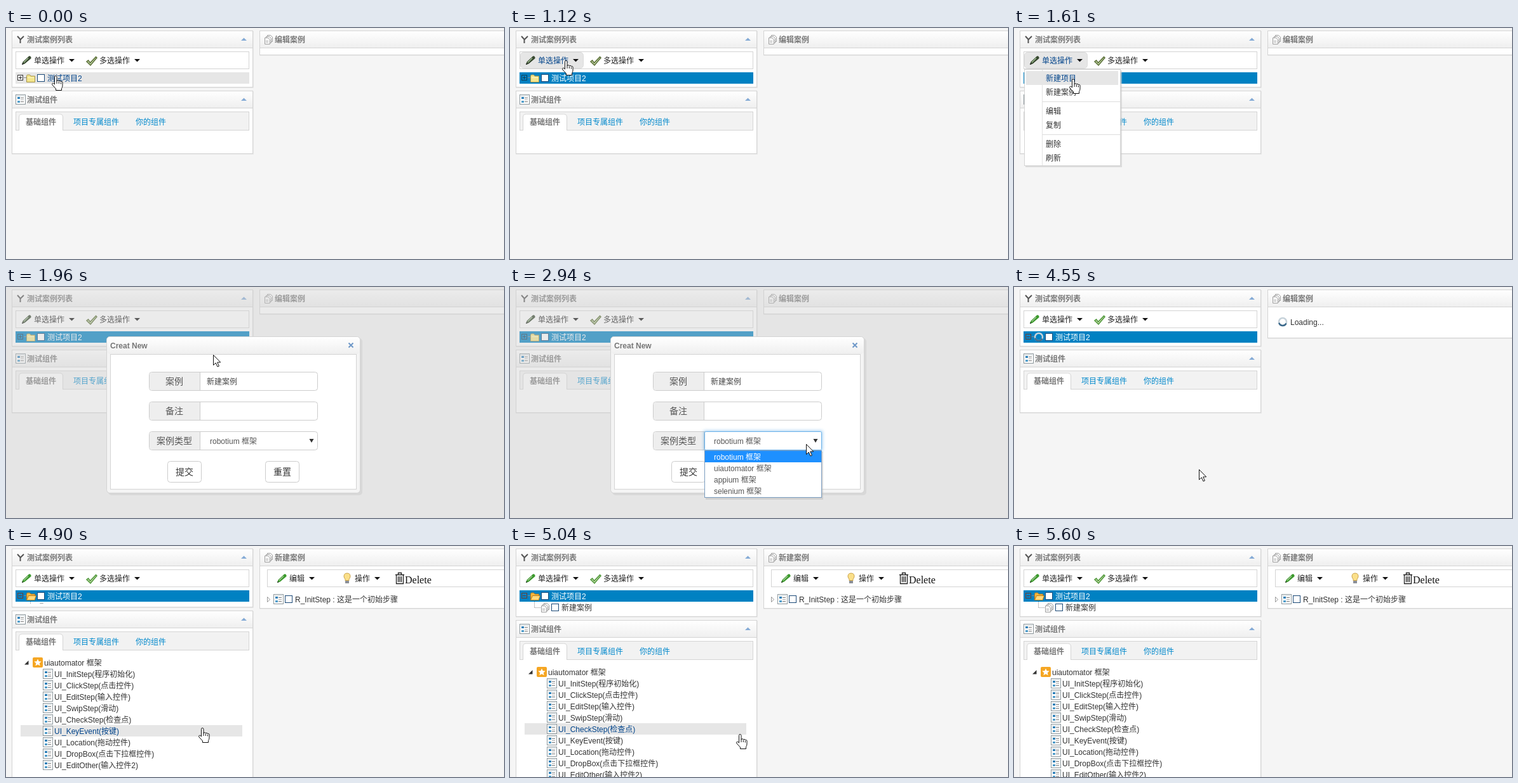
These frames come from a looping animation (784x365 px, 5880 ms). An HTML page:

```html
<!DOCTYPE html>
<html lang="zh">
<head>
<meta charset="utf-8">
<title>Test case editor</title>
<style>
html, body { margin: 0; width: 100%; height: 100%; overflow: hidden; background: #f5f5f5; }
svg { display: block; width: 784px; height: 365px; }
text { font: 12px "Liberation Sans", "Noto Sans CJK SC", "Noto Sans CJK", sans-serif; white-space: pre; }
.b { font-weight: bold; }
.l { font-size: 14px; }
.m { text-anchor: middle; }
.s { font: 16px "Liberation Serif", serif; }
</style>
</head>
<body>
<svg id="stage" viewBox="0 0 784 365" xmlns="http://www.w3.org/2000/svg">
  <defs>
    <linearGradient id="head" x2="0" y2="1">
      <stop offset="0" stop-color="#fff"/><stop offset="1" stop-color="#efefef"/>
    </linearGradient>
    <filter id="glow" x="-20%" y="-60%" width="140%" height="220%"><feGaussianBlur stdDeviation="2.5"/></filter>
  </defs>
  <g id="scene"></g>
</svg>
<script>
const LOOP = 5880, STEP = 70;
const NAVY = '#00438a', BLUE = '#0081c2', LINK = '#0088cc', LINE = '#d4d4d4', GREY = '#777', INK = '#333';
const scene = document.getElementById('scene');

// cursor hot spot: time, x, y
const PATH = [
  [0, 78, 75], [770, 78, 75], [980, 88, 52], [1050, 88, 52], [1120, 88, 51], [1330, 88, 51],
  [1750, 96, 95], [1890, 96, 95], [1960, 326, 107], [2170, 456, 196], [2240, 456, 196],
  [2520, 483, 244], [2870, 483, 244], [3360, 365, 275], [3780, 365, 275], [3850, 363, 276],
  [4130, 291, 288], [4760, 291, 288], [4900, 309, 287], [4970, 316, 288], [5600, 730, 372]
];
const STEPS = ['InitStep(程序初始化)', 'ClickStep(点击控件)', 'EditStep(输入控件)', 'SwipStep(滑动)',
  'CheckStep(检查点)', 'KeyEvent(按键)', 'Location(拖动控件)', 'DropBox(点击下拉框控件)', 'EditOther(输入控件2)'];
const MENU = ['新建项目', '新建案例', '', '编辑', '复制', '', '删除', '刷新'];
const FRAMEWORKS = ['robotium 框架', 'uiautomator 框架', 'appium 框架', 'selenium 框架'];

function pointer(t) {
  const i = PATH.findIndex(k => k[0] > t);
  if (i < 0) return { x: 730, y: 372 };
  const [a, x, y] = PATH[i - 1], [b, u, v] = PATH[i], p = (t - a) / (b - a);
  return { x: Math.round(x + (u - x) * p), y: Math.round(y + (v - y) * p) };
}

const fill = (x, y, w, h, c, more = '') => `<rect x="${x}" y="${y}" width="${w}" height="${h}" fill="${c}" ${more}/>`;
const box = (x, y, w, h, c, line = LINE, r = 0) => fill(x + .5, y + .5, w, h, c, `stroke="${line}" rx="${r}"`);
// text is placed by the middle of its line
const text = (x, mid, s, c = INK, cls = '') =>
  `<text x="${x}" y="${mid + (/l/.test(cls) ? 5.3 : 4.5)}" fill="${c}" class="${cls}">${s}</text>`;
const path = (d, c, line = 'none', w = 1) =>
  `<path d="${d}" fill="${c}" stroke="${line}" stroke-width="${w}"/>`;
const at = (x, y, s) => `<g transform="translate(${x} ${y})">${s}</g>`;
const caret = (x, y) => path(`M${x} ${y - 2}h9l-4.5 4.5z`, '#111');
const check = (x, y) => box(x, y, 11, 11, '#fff', '#1c4a78');

const pencil = (x, y, c) => at(x, y,
  path('M0 14l1.5-4.5L10.500 1q2-1.500 3.500.5t0 3L4.500 12.500z', c) + path('M3 10.500l7-7', 'none', '#a9c79c', 1.300) + path('M0 14l.8-2.500 1.700 1.700z', '#222'));
const tick = (x, y, c) => path(`M${x} ${y + 8}l2.500-2 3 4 9-9.500 1.500 1.500-10 12z`, '#c9dcb0', c, 1.500);
const component = (x, y) => at(x, y, box(0, 0, 15, 15, '#fff', '#8c979c') + fill(2, 2, 12, 1, '#c8d2d6')
  + fill(3, 4, 4, 3, '#2b7fb8') + fill(3, 10, 4, 3, '#4f9cc9')
  + fill(8, 5, 5, 1, '#777') + fill(8, 8, 5, 1, '#aaa') + fill(8, 11, 5, 1, '#777'));
const page = (x, y) => path(`M${x + .5} ${y + .5}h5l3 3v7h-8z`, '#f6f6f6', '#a0a0a0') + fill(x + 2, y + 5, 4, 1, '#bbb') + fill(x + 2, y + 7, 4, 1, '#bbb');
const pages = (x, y) => page(x + 4, y) + page(x + 2, y + 2) + page(x, y + 4);
const spinner = (x, y, t) => `<g fill="none" stroke-width="2.500"><circle cx="${x}" cy="${y}" r="6" stroke="#c6d2da"/>
  <path d="M${x} ${y - 6}a6 6 0 0 1 4 10.500" stroke="#3c6a8c" transform="rotate(${t * .5} ${x} ${y})"/></g>`;
const star = (x, y) => fill(x, y, 16, 16, '#f5a623', 'rx="2"')
  + path(`M${x + 8} ${y + 2.500}l1.700 3.700 4 .4-3 2.700.9 4-3.600-2.100-3.600 2.100.9-4-3-2.700 4-.4z`, '#fff');

function folder(x, y, vivid, open) {
  const c = vivid ? '#f6b73c' : '#f3e58c', line = vivid ? '#b9791b' : '#a3924a';
  return path(`M${x + .5} ${y + 12.500}v-10l1-1.500h4l1.500 2h6.500v9.500z`, c, line)
    + (open ? path(`M${x + .5} ${y + 12.500}l3-7h12l-2.500 7z`, '#ffd97a', line) : fill(x + 2, y + 5, 10, 1, '#fff8c8'));
}

function panel(x, y, w, h, title) {
  return fill(x, y + 1, w + 2, h + 1, '#e9e9e9') + box(x, y, w, h, '#fff') + fill(x + 1, y + 1, w - 1, 26, 'url(#head)')
    + fill(x, y + 27, w, 1, LINE) + text(x + 24, y + 14, title, GREY, 'b')
    + (w < 380 ? path(`M370 ${y + 16}h9l-4.500-4.500z`, '#85abd6') : '');
}

const arrow = ({ x, y }) => at(x, y, path('M.5.5v16l3.700-3.500 2.800 6 2.400-1-2.700-6h5z', '#fff', '#111'));
const hand = ({ x, y }) => at(x - 6, y,
  path('M4.500 14V2.500q0-2 1.700-2t1.800 2V9q.3-1.500 1.800-1.300t1.500 1.600q.4-1.100 1.700-.9t1.400 1.700q.4-.9 1.400-.7t1.200 1.600V16q0 2.500-1.500 4.500v3h-9v-2.500L1 15q-1.100-2 .3-2.700t3.200 1.700z', '#fff', '#111')
  + path('M8 9v4M11.300 10v3M14.400 11v2.500', 'none', '#111'));

function cases(t, p, drop) {
  const vivid = t >= 4410, busy = t >= 4480, expanded = t >= 4830;
  const selected = t >= 560, over = t >= 910 && t < 1960;
  const green = vivid ? '#3b9a2c' : '#37482f', mark = vivid ? '#4b9636' : '#566b32';
  let s = panel(9, 4, 379, 89 + drop, '测试案例列表');
  s += path('M18 13l4.500 5v6M28 13l-5 5', 'none', '#555', 2);
  s += box(15, 37, 367, 27, '#fff');
  if (over) s += box(16, 38, 99, 25, '#e6e6e6', '#dcdcdc', 5);
  s += pencil(25, 44, green) + text(44, 51, '单选操作', over ? NAVY : '#222') + caret(99, 51);
  s += tick(127, 45, mark) + text(147, 51, '多选操作', '#222') + caret(202, 51);

  s += fill(15, 70, 368, 18, selected ? BLUE : '#e6e6e6');
  const sign = vivid ? '#6b4038' : selected ? '#123f5a' : '#333';
  s += box(18, 74, 8, 8, selected ? 'none' : '#fff', sign) + fill(20, 78, 5, 1, sign);
  if (!busy) s += fill(22, 76, 1, 5, sign);
  s += path('M28 78.500h4', 'none', '#888') ;
  s += busy && !expanded ? spinner(39, 79, t) : folder(32, 73, vivid, expanded);
  s += check(49, 73) + text(65, 79, '测试项目2', selected ? '#fff' : NAVY);
  if (drop) {
    s += `<clipPath id="slide">${fill(15, 88, 368, drop, '#000')}</clipPath><g clip-path="url(#slide)">`
      + '<path d="M38.500 88v9M39 97.500h9" stroke="#888" fill="none" stroke-dasharray="1 1"/>'
      + pages(49, 90) + check(65, 91) + text(81, 97, '新建案例') + '</g>';
  }
  return s;
}

function components(t, p, drop) {
  const loaded = t >= 4760;
  let s = panel(9, 99, 379, loaded ? 300 : 99, '测试组件') + component(15, 105);
  s += box(15, 132, 367, 29, '#f2f2f2');
  s += path('M20.500 162v-21q0-5 5-5h59q5 0 5 5v21', '#fff', LINE);
  s += text(31, 148, '基础组件', GREY, 'b') + text(106, 148, '项目专属组件', LINK) + text(204, 148, '你的组件', LINK);
  if (loaded) {
    s += path('M35.500 178v6.500h-6.500z', INK) + star(42, 173) + text(60, 181, 'uiautomator 框架');
    STEPS.forEach((name, i) => {
      const mid = 199 + 18 * i, y = p.y - drop;
      const over = p.x < 372 && y >= mid - 9 && y < mid + 9;
      if (over) s += fill(23, mid - 9, 349, 18, '#e6e6e6');
      s += component(58, mid - 8) + text(76, mid, 'UI_' + name, over ? NAVY : INK);
    });
  }
  return at(0, drop, s);
}

function editor(t) {
  const loading = t >= 4480 && t < 4760, ready = t >= 4760;
  let s = panel(399, 4, 400, ready ? 94 : loading ? 76 : 38, ready ? '新建案例' : '编辑案例') + pages(407, 11);
  if (loading) s += spinner(423, 55, t) + text(435, 55.500, 'Loading...');
  if (!ready) return s;
  s += box(411, 37, 390, 27, '#fff') + pencil(427, 44, '#3b9a2c') + text(446, 51, '编辑', '#222') + caret(477, 51);
  s += path('M537 43q5 0 5 5 0 2-2 4.500v2h-6v-2q-2-2.500-2-4.500 0-5 5-5z', '#fbe08a', '#c9a24a')
    + fill(534, 55, 6, 4, '#8a8f98') + text(549, 51, '操作', '#222') + caret(580, 51);
  s += path('M613 45.500h14M617.500 45v-2.500h5V45M614.500 46v13.500h11V46M617.500 48v9M620 48v9M622.500 48v9', 'none', '#222', 1.300);
  s += text(628, 54.500, 'Delete', '#111', 's');
  s += path('M411.500 80.500v8l4-4z', '#fff', '#999') + component(421, 76) + check(439, 78);
  return s + text(455, 84, 'R_InitStep : 这是一个初始步骤');
}

function menu(p) {
  let s = fill(18, 67, 152, 153, '#ccc', 'opacity=".6"') + box(16, 65, 151, 152, '#fff') + fill(44, 66, 1, 151, '#e2e2e2');
  let y = 68;
  for (const item of MENU) {
    const h = item ? 22 : 8;
    if (!item) s += fill(45, y + 4, 122, 1, '#ddd');
    else {
      const over = p.y >= y && p.y < y + h;
      if (over) s += fill(19, y, 145, h, '#e6e6e6');
      s += text(50, y + 11, item, over ? NAVY : INK);
    }
    y += h;
  }
  return s;
}

function field(y, label, value) {
  return box(225, y, 265, 29, '#fff', '#ccc', 4) + path(`M306 ${y + 1}h-76q-4 0-4 4v20q0 4 4 4h76z`, '#eee')
    + fill(305, y, 1, 30, '#ccc') + text(265, y + 15, label, '#555', 'l m') + text(316, y + 15, value, '#444');
}

function button(x, label, over) {
  return box(x, 275, 53, 33, over ? '#e6e6e6' : '#fff', over ? '#adadad' : '#ccc', 4) + text(x + 27, 292, label, INK, 'l m');
}

function dialog(t, p) {
  const focus = t >= 2730, list = t >= 2800 && t < 3850;
  const choice = t >= 3850 ? 1 : 0;
  let s = fill(0, 0, 784, 365, '#ccc', 'opacity=".4"') + fill(161, 81, 400, 248, '#d8d8d8', 'rx="5"');
  s += box(158, 78, 399, 247, '#f4f4f4', LINE, 5) + fill(159, 79, 398, 27, 'url(#head)', 'rx="5"');
  s += text(164, 92, 'Creat New', GREY, 'b') + path('M539.500 88.500l7 7m0-7l-7 7', 'none', '#6f98c8', 2);
  s += box(164, 106, 387, 213, '#fff');
  s += field(134, '案例', '新建案例') + field(181, '备注', '') + field(228, '案例类型', '');
  if (focus) s += fill(305, 227, 187, 32, '#66afe9', 'opacity=".6" filter="url(#glow)"') + box(306, 228, 184, 29, '#fff', '#66afe9', 2);
  s += text(321, 243, FRAMEWORKS[choice], '#555') + path('M477.500 240h7l-3.500 6z', INK);
  s += button(254, '提交', t >= 3990 && p.x < 308) + button(408, '重置', false);
  if (list) {
    const pick = p.y < 277 && p.x > 400 ? 0 : 1;
    s += fill(308, 260, 185, 76, '#bbb', 'opacity=".5"') + box(306, 258, 184, 74, '#fff', '#7a9cbf');
    FRAMEWORKS.forEach((name, i) => {
      const y = 259 + 18 * i, on = i === pick;
      if (on) s += fill(307, y, 183, 18, '#1e90ff');
      s += text(321, y + 9, name, on ? '#fff' : '#555');
    });
  }
  return s;
}

function draw(t) {
  const p = pointer(t);
  const k = Math.min(1, Math.max(0, (t - 4846) / 200));
  const drop = Math.round(18 * (.5 - Math.cos(Math.PI * k) / 2));
  const modal = t >= 1960 && t < 4410;
  let s = fill(0, 0, 784, 365, '#f5f5f5') + cases(t, p, drop) + components(t, p, drop) + editor(t);
  if (t >= 1260 && t < 1960) s += menu(p);
  if (modal) s += dialog(t, p);
  const link = t < 1960 || (modal && t >= 3990 && p.x < 308) || (t >= 4760 && p.x < 372);
  if (t < 5600) s += link ? hand(p) : arrow(p);
  scene.innerHTML = s;
}

let shown = -1;
function tickFrame(now) {
  const t = Math.floor(now % LOOP / STEP) * STEP;
  if (t !== shown) draw(shown = t);
  requestAnimationFrame(tickFrame);
}
tickFrame(performance.now());
</script>
</body>
</html>
```
